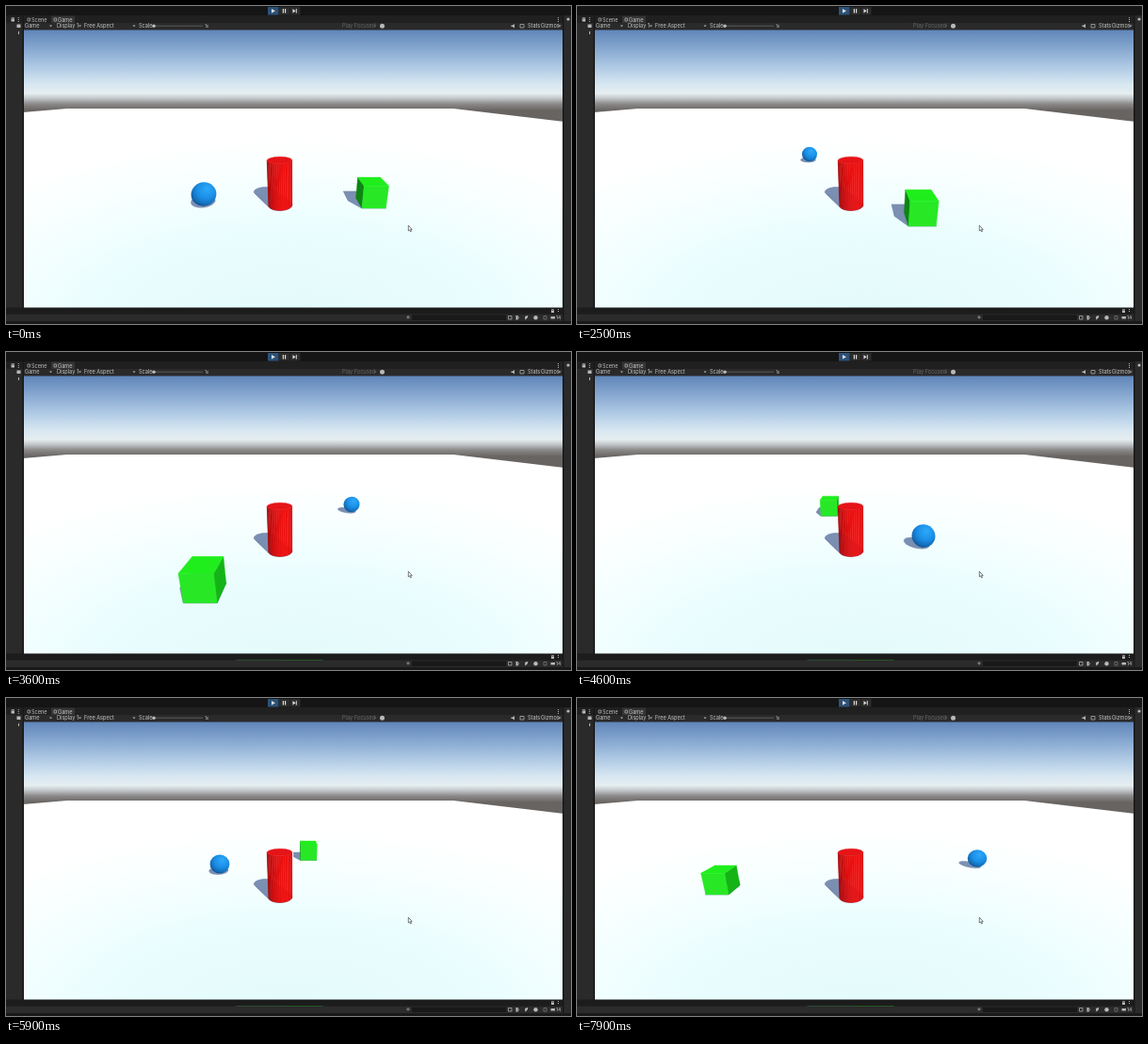
An HTML page with a canvas that plays this animation: 600 px wide and 338 px high, repeating every 8 s.

```html
<!DOCTYPE html>
<html lang="en">
<head>
<meta charset="utf-8">
<title>Orbiting shapes</title>
<style>
html, body { margin: 0; width: 100%; height: 100%; overflow: hidden; background: #191919; }
canvas, svg { position: absolute; left: 0; top: 0; width: 600px; height: 338px; }
text { font: 5.6px Inter, Arial, sans-serif; fill: #c4c4c4; }
</style>
</head>
<body>
<canvas id="view" width="600" height="338"></canvas>
<svg viewBox="0 0 600 338">
  <!-- editor panels around the game view -->
  <path fill="#151515" d="M0 0H600V10H0Z"/>
  <path fill="#202020" d="M0 10H600V18H0Z"/>
  <path fill="#2a2a2a" d="M0 18H600V25.5H0ZM0 25H18V321H0ZM592 10H600V338H592Z"/>
  <path fill="#353535" d="M48 10.5H73V18H48Z"/>
  <path fill="#1c1c1c" d="M0 320.5H592V327.5H0Z"/>
  <path fill="#2b2b2b" d="M0 327.5H592V335H0Z"/>
  <path fill="#191919" d="M0 335H600V338H0ZM17.5 10H19V321H17.5ZM591 10H592.5V338H591Z"/>
  <path fill="#2c5278" d="M278 1H289.5V9.5H278Z"/>
  <path fill="#2b2b2b" d="M290 1H301V9.5H290ZM301.5 1H312.5V9.5H301.5Z"/>
  <path fill="#dedede" d="M282 3L286 5.3L282 7.6ZM293.8 3H295V7.6H293.8ZM296 3H297.2V7.6H296ZM304.5 3L307.5 5.3L304.5 7.6ZM307.8 3H308.8V7.6H307.8Z"/>
  <g fill="none" stroke="#aaa" stroke-width=".8">
    <path d="M6 13.5V12.5H8.5V13.5M23 13H25.5V16H23ZM51 13H53.5V16H51Z"/>
    <path stroke="#666" d="M156 21.2H209"/>
    <path d="M546 19.5H550V23H546ZM579.5 323.5V322.5H581.5V323.5"/>
    <path d="M533.5 329.5H537V333H533.5ZM543 329.5L545 331.3L543 333M551.5 333L554 329.5"/>
    <path stroke="#777" d="M571 329.5H574V333H571Z"/>
    <circle cx="427" cy="330.8" r="1.1"/>
  </g>
  <path fill="#191919" d="M431 328.5H531V334H431Z"/>
  <g fill="#b8b8b8">
    <path d="M5.5 13.5H9V16.5H5.5ZM12.8 12H13.8V13H12.8ZM12.8 14H13.8V15H12.8ZM12.8 16H13.8V17H12.8ZM13 27H14V30H13Z"/>
    <path d="M586 12H587V13H586ZM586 14H587V15H586ZM586 16H587V17H586ZM586 322H587V323H586ZM586 324H587V325H586ZM579 323.5H582V326H579Z"/>
    <path d="M536.5 20.5H538L540 19V23.5L538 22H536.5ZM11.5 19.5H15.5V23H11.5Z"/>
    <path d="M46 20.5H49L47.5 22.2ZM77 20.5H80L78.5 22.2ZM134.500 20.5H137.500L136 22.2ZM586.500 20.5H589.500L588 22.2Z"/>
    <path fill="#666" d="M390.500 20.5H393.500L392 22.2Z"/>
    <circle cx="157" cy="21.2" r="1.8"/>
    <circle cx="399.500" cy="21.2" r="2.5"/>
    <circle cx="562.500" cy="331.200" r="2.2"/>
    <circle cx="597" cy="14" r="1.6"/>
    <path d="M541.500 329H543.500V333.500H541.500ZM551 330L554 329V331L551.500 333.500ZM578.500 330H583V332.500H578.500Z"/>
  </g>
  <text x="27" y="16.500">Scene</text>
  <text x="55" y="16.500">Game</text>
  <text x="20" y="23.200">Game</text>
  <text x="54" y="23.200">Display 1</text>
  <text x="83" y="23.200">Free Aspect</text>
  <text x="141" y="23.200">Scale</text>
  <text x="211" y="23.200" style="font-size:4.600px">1x</text>
  <text x="357" y="23.200" style="fill:#666">Play Focused</text>
  <text x="554" y="23.200">Stats</text>
  <text x="568" y="23.200">Gizmos</text>
  <text x="584" y="333.200" style="font-size:5px">14</text>
  <path fill="#fff" stroke="#444" stroke-width=".7" d="M427.300 233.200V239L428.600 237.900L429.600 240L430.500 239.500L429.600 237.500H431.200Z"/>
</svg>
<script>
const ctx = document.getElementById('view').getContext('2d');

// Pinhole camera: focal length, image centre, height, pitch
const F = 256, CX = 305, CY = 173, H = 4.72;
const SIN = 0.315, COS = 0.949;
const SHADE = '#7a8fb2';
const SLANT = [-0.42, 0.727]; // shadow offset per unit of height
const LIGHT = [0.321, -0.557];
const BASE = [-0.55, 9.3];

function project([x, y, z]) {
  const d = H - y, depth = z * COS + d * SIN;
  return [CX + F * x / depth, CY + F * (d * COS - z * SIN) / depth, depth];
}

// Screen point to world x, z for something centred half a unit up
function unproject(sx, sy) {
  const v = (sy - CY) / F, depth = (H - 0.5) / (SIN + v * COS);
  return [(sx - CX) / F * depth, depth * (COS - v * SIN)];
}

// Rows: seconds, screen x, screen y
const track = rows => rows.map(([t, x, y]) => [t, ...unproject(x, y)]);
const ballPath = track([
  [0.6, 210, 200], [1.5, 219, 188], [2, 234, 171], [2.5, 247, 157.5],
  [3.05, 306, 153], [3.6, 367, 162], [4.1, 388, 175.6], [4.6, 368, 195.5],
  [5.1, 293, 235], [5.5, 208, 205], [5.9, 227, 176.5], [6.5, 306, 163],
  [6.9, 359, 167], [7.1, 388.5, 171.5], [7.5, 416, 172], [7.9, 425, 170.5]
]);
const boxPath = track([
  [0.6, 388, 198], [1.5, 372, 198], [2.35, 367, 204], [2.5, 364.5, 214],
  [3, 340, 282], [3.3, 239, 283], [3.6, 210.5, 241], [3.95, 150, 203],
  [4.6, 268.5, 163.5], [5.28, 297, 147], [5.9, 321, 162], [6.4, 352, 185],
  [6.9, 297, 232], [7.1, 232.5, 261], [7.2, 188, 265], [7.5, 115, 237],
  [7.8, 138, 203], [7.9, 153.5, 193]
]);

// Smooth curve through the keys, starting at rest
function at(path, t) {
  const last = path.length - 1;
  if (t <= path[0][0]) return path[0].slice(1);
  if (t >= path[last][0]) return path[last].slice(1);
  let i = 0;
  while (path[i + 1][0] <= t) i++;
  const a = path[i], b = path[i + 1], h = b[0] - a[0], s = (t - a[0]) / h;
  const slope = (k, c) => {
    if (k === 0) return 0;
    const p = path[k - 1], n = path[Math.min(k + 1, last)];
    return (n[c] - p[c]) / (n[0] - p[0]);
  };
  const s2 = s * s, s3 = s2 * s;
  return [1, 2].map(c =>
    (2 * s3 - 3 * s2 + 1) * a[c] + (s3 - 2 * s2 + s) * h * slope(i, c) +
    (3 * s2 - 2 * s3) * b[c] + (s3 - s2) * h * slope(i + 1, c));
}

function poly(points, color) {
  ctx.beginPath();
  points.forEach(p => ctx.lineTo(...project(p).slice(0, 2)));
  ctx.closePath();
  ctx.fillStyle = ctx.strokeStyle = color;
  ctx.lineWidth = 0.4;
  ctx.fill();
  ctx.stroke();
}

const ring = (n, fn) => Array.from({ length: n }, (_, i) => fn(i / n * 2 * Math.PI));
const circle = ([x, z], y) => ring(40, a => [x + Math.cos(a) / 2, y, z + Math.sin(a) / 2]);
const square = ([x, z], y) =>
  [[-1, -1], [1, -1], [1, 1], [-1, 1]].map(([i, j]) => [x + i / 2, y, z + j / 2]);

function castShadow(foot, height) {
  const tip = foot.map(([x, , z]) => [x + SLANT[0] * height, 0, z + SLANT[1] * height]);
  foot.forEach((p, i) => {
    const j = (i + 1) % foot.length;
    poly([p, foot[j], tip[j], tip[i]], SHADE);
  });
  poly(foot, SHADE);
  poly(tip, SHADE);
}

function ballShadow([x, z]) {
  const cx = x + SLANT[0] / 2, cz = z + SLANT[1] / 2;
  poly(ring(32, a => {
    const u = 0.653 * Math.cos(a), v = 0.5 * Math.sin(a);
    return [cx - u * 0.5 + v * 0.866, 0, cz + u * 0.866 + v * 0.5];
  }), SHADE);
}

function drawBall([x, z]) {
  const [sx, sy, depth] = project([x, 0.5, z]);
  const r = F * 0.5 / depth, dx = sx - CX, dy = sy - CY;
  const turn = Math.atan2(dy, dx);
  ctx.save();
  ctx.translate(sx, sy);
  ctx.rotate(turn);
  ctx.scale(Math.hypot(1, dx / F, dy / F), 1);
  ctx.rotate(-turn);
  const g = ctx.createRadialGradient(r * 0.25, -r * 0.45, r * 0.1, r * 0.2, -r * 0.3, r * 1.4);
  g.addColorStop(0, '#2ba6f8');
  g.addColorStop(0.5, '#1a8ee6');
  g.addColorStop(0.8, '#1470bb');
  g.addColorStop(1, '#0d4b85');
  ctx.fillStyle = g;
  ctx.beginPath();
  ctx.arc(0, 0, r, 0, 7);
  ctx.fill();
  ctx.restore();
}

function drawBox(pos) {
  const lo = square(pos, 0), hi = square(pos, 1);
  const side = (i, j, color) => poly([lo[i], lo[j], hi[j], hi[i]], color);
  if (pos[0] > 0.5) side(0, 3, '#0d8512');
  if (pos[0] < -0.5) side(1, 2, '#14b416');
  side(0, 1, '#28e826');
  poly(hi, '#1fee1c');
}

function drawCylinder() {
  const lo = circle(BASE, 0), hi = circle(BASE, 2), n = lo.length;
  lo.forEach((p, i) => {
    const a = (i + 0.5) / n * 2 * Math.PI, nx = Math.cos(a), nz = Math.sin(a);
    if (nx * BASE[0] + nz * BASE[1] > -0.5) return;
    const k = Math.max(0, nx * LIGHT[0] + nz * LIGHT[1]) / 0.643;
    const j = (i + 1) % n;
    poly([p, lo[j], hi[j], hi[i]], `rgb(${170 + 70 * k | 0},${8 + 10 * k | 0},${10 + 8 * k | 0})`);
  });
  poly(hi, '#e51417');
}

function fade(g, stops) {
  stops.forEach(([p, c]) => g.addColorStop(p, c));
  return g;
}
const sky = fade(ctx.createLinearGradient(0, 25, 0, 111), [
  [0, '#5f85b8'], [0.25, '#88a9d1'], [0.48, '#b2cce6'], [0.68, '#d8e7f1'],
  [0.79, '#e6eef0'], [0.85, '#c3c8ca'], [0.92, '#8b8989'], [1, '#686462']
]);
const floor = fade(ctx.createRadialGradient(0, 0, 0, 0, 0, 1), [
  [0, '#e3fafb'], [0.5, '#ebfdfe'], [0.75, '#f6ffff'], [1, '#ffffff']
]);

function drawStage() {
  ctx.fillStyle = sky;
  ctx.fillRect(18, 25, 575, 100);
  ctx.save();
  ctx.beginPath();
  [[18, 113], [65, 109], [475, 109], [593, 123], [593, 322], [18, 322]]
    .forEach(p => ctx.lineTo(...p));
  ctx.clip();
  ctx.translate(305, 330);
  ctx.scale(440, 190);
  ctx.fillStyle = floor;
  ctx.fillRect(-1, -2, 2, 3);
  ctx.restore();
}

function render() {
  const t = Math.floor(performance.now() % 8000 / 100) / 10;
  const ball = at(ballPath, t), box = at(boxPath, t);
  drawStage();
  castShadow(circle(BASE, 0), 2);
  castShadow(square(box, 0), 1);
  ballShadow(ball);
  [[ball, drawBall], [box, drawBox], [BASE, drawCylinder]]
    .sort((a, b) => b[0][1] - a[0][1])
    .forEach(([pos, draw]) => draw(pos));
  requestAnimationFrame(render);
}
render();
</script>
</body>
</html>
```
